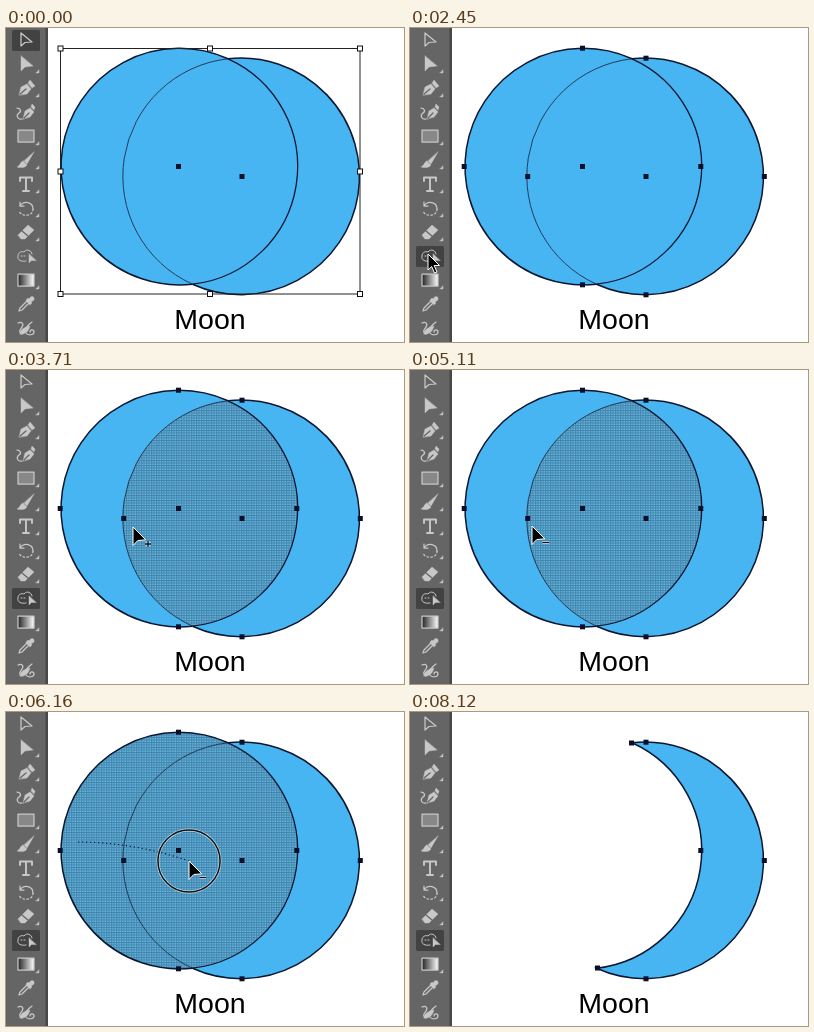
These frames come from a looping animation (398 px wide and 314 px high, 8.26 s). An HTML page:

```html
<!DOCTYPE html>
<html lang="en">
<head>
<meta charset="utf-8">
<title>Moon from two circles</title>
<style>
  html, body { margin: 0; width: 100%; height: 100%; overflow: hidden; background: #fff; }
  svg { display: block; width: 398px; height: 314px; }
  .line { fill: none; stroke: #0b1730; }
  .icon { fill: none; stroke: #c8c8c8; stroke-width: 1.25; stroke-linejoin: round; stroke-linecap: round; }
  .icon .solid { fill: #c8c8c8; stroke-width: .4; }
</style>
</head>
<body>
<svg viewBox="0 0 398 314">
  <defs>
    <pattern id="mesh" width="2.5" height="2.5" patternUnits="userSpaceOnUse">
      <rect width="2.5" height="2.5" fill="#66bbe8"/>
      <path d="M0 .6H2.5M.6 0V2.5" stroke="#0c2f4a" stroke-opacity=".4" stroke-width="1"/>
    </pattern>
    <linearGradient id="ramp"><stop stop-color="#222"/><stop offset="1" stop-color="#fff"/></linearGradient>
  </defs>
  <rect width="398" height="314" fill="#fff"/>
  <g id="toolbar">
    <rect width="41" height="314" fill="#656565"/>
    <rect x="39.5" width="2.5" height="314" fill="#484848"/>
    <rect id="button" x="6" width="28" height="21" rx="1.5" fill="#424242"/>
    <g id="icons"></g>
  </g>
  <g id="art"></g>
  <text x="204" y="301.4" text-anchor="middle" font-size="28.5" font-family="'Liberation Sans', Arial, sans-serif">Moon</text>
  <path id="trail" fill="none" stroke="#0b1730" stroke-width="1.1" stroke-dasharray="1.3 2.7"/>
  <g id="ring" fill="none">
    <circle stroke="#fff" stroke-opacity=".6" stroke-width="3"/>
    <circle stroke="#111" stroke-width="1.5"/>
  </g>
  <g id="cursor">
    <path id="arrow" fill="#000" stroke="#fff" stroke-width="1"/>
    <path class="sign" fill="none" stroke="#fff" stroke-opacity=".7" stroke-width="3"/>
    <path class="sign" fill="none" stroke="#0b1020" stroke-width="1.3"/>
  </g>
</svg>
<script>
const LOOP = 8260, STEP = 70;
const PICK = 2240, ALT = 4480, DRAG = 5700, CUT = 6300, ALT_UP = 7350;
const RING_TIME = 280, RING_SIZE = 50, ringStarts = [2100, 5986];
const $ = id => document.getElementById(id);

// Geometry of the two circles and the regions between them
const R = 118.3, A = [172.5, 138.5], B = [236, 148.5];
const peak = '222 30.8', foot = '186.5 256.2';
const arc = (large, sweep, to) => `A${R} ${R} 0 ${large} ${sweep} ${to}`;
const outerA = `M${peak}${arc(1, 0, foot)}`;
const innerA = `M${peak}${arc(0, 1, foot)}`;
const outerB = `M${peak}${arc(1, 1, foot)}`;
const innerB = `M${peak}${arc(0, 0, foot)}`;
const regions = {
  left: outerA + arc(0, 1, peak) + 'Z',
  lens: innerA + arc(0, 1, peak) + 'Z',
  right: outerB + arc(0, 0, peak) + 'Z'
};

const line = (d, width = 1.5) => `<path class="line" d="${d}" stroke-width="${width}"/>`;
const fill = (name, paint) => `<path d="${regions[name]}" fill="${paint}"/>`;
const square = ([x, y]) => `<rect x="${x - 2.5}" y="${y - 2.5}" width="5" height="5" fill="#0b1028"/>`;
const handle = ([x, y]) =>
  `<rect x="${x - 2.5}" y="${y - 2.5}" width="5" height="5" fill="#fff" stroke="#111"/>`;
const quadrants = ([x, y]) => [[x, y - R], [x + R, y], [x, y + R], [x - R, y]];
const centres = [A, B].map(square).join('');
const anchors = [...quadrants(A), ...quadrants(B)].map(square).join('');
const moonAnchors = [[221.5, 31], [187.5, 256], [A[0] + R, A[1]], ...quadrants(B).slice(0, 3)].map(square).join('');

const xs = [54.5, 204, 354], ys = [20.5, 143.5, 266];
const frameBox = '<path d="M54.5 20.5H354V266H54.5Z" fill="none" stroke="#222"/>' +
  xs.flatMap((x, i) => ys.filter((y, j) => i !== 1 || j !== 1).map(y => handle([x, y]))).join('');

// Toolbar icons, each drawn around its own centre
const icons = [
  '<path d="M-5-7V6L-1 2.5 6 2Z"/>',
  '<path class="solid" d="M-5-8V7L-1 3 7 2Z"/>',
  '<path class="solid" d="M-7 7L-5-1 1-4 5 1 1 6Z M2-5L4-8 9-2 6 0Z"/><path stroke="#656565" d="M-6 6L0 1"/>',
  '<path class="solid" d="M-3 7L-1-1 4-4 8 0 4 5Z M5-5L6-8 9-5 8-2Z"/><path stroke="#656565" d="M-2 6L3 1"/><path d="M-4 7C-9 8-10 3-7 1S-6-4-9-4"/>',
  '<rect x="-8" y="-6" width="16" height="12" fill="#888"/>',
  '<path class="solid" d="M8-8L1 4-2 1Z M-3 1L1 5C-1 8-5 8-9 7-6 6-6 2-3 1Z"/>',
  '<path d="M-6-3V-6.5H6V-3M0-6.500V7M-3 7H3" stroke-width="1.9"/>',
  '<path d="M-6-6V-2H-2M-6-2C-2-8 7-6 7 1"/><path d="M7 1C7 9-5 9-7 3" stroke-dasharray="1.5 2.5"/>',
  '<path class="solid" d="M-8 3L2-7 8-2-1 7H-5Z"/><path d="M-4-1L2 4" stroke="#656565"/>',
  '<g stroke-width="1"><path d="M0 5C-5 6-9 4-8 0-8-4-4-5-2-4 1-8 6-5 6-2"/><path d="M-5 0H1" stroke-dasharray="1 2"/></g><path class="solid" d="M3-2V7L5.500 4.500 10 4.500Z"/>',
  '<rect x="-8" y="-6" width="16" height="12" fill="url(#ramp)"/>',
  '<path d="M-7 7L-6 4 1-3 3-1-4 6Z"/><path class="solid" d="M0-4L2-6 3-5C5-9 9-8 8-4L5-2 6-1 4 1Z"/>',
  '<path d="M-8-5C-4-7-2-4-4-1S-8 4-4 6M-4 3C0 2 1-3 6-6M0 5C2 8 8 7 8 4S4 1 4 4"/><path class="solid" d="M-6 6C-6 1-1-1 4-2 3 2 0 7-6 6Z"/>'
];
const noFlyout = [0, 3, 9, 11, 12];
$('icons').innerHTML = icons.map((shape, i) => {
  const flyout = noFlyout.includes(i) ? '' : '<path class="solid" d="M13 6V9H10Z"/>';
  return `<g class="icon" transform="translate(20 ${12 + i * 24})">${shape}${flyout}</g>`;
}).join('');

// Cursor stops: time, x, y and the power that bends the way there
const stops = [
  [1260, 265, 200], [2100, 18, 226], [2800, 18, 226], [3220, 123, 165], [3500, 127, 157],
  [5040, 127, 157], [5110, 122, 156], [5500, 73, 130], [DRAG, 72, 130], [6160, 183, 149, 2],
  [6440, 208, 163], [7700, 208, 163], [8120, 214, 322]
];
const ease = u => u * u * (3 - 2 * u);

function cursorAt(t) {
  const i = stops.findIndex(s => s[0] >= t);
  if (i < 1) return stops[0].slice(1, 3);
  const [t0, x0, y0] = stops[i - 1], [t1, x1, y1, bend = 1] = stops[i];
  const k = ease((t - t0) / (t1 - t0));
  return [x0 + (x1 - x0) * k, y0 + (y1 - y0) * k ** bend];
}

function regionAt([x, y]) {
  const inA = Math.hypot(x - A[0], y - A[1]) < R;
  const inB = Math.hypot(x - B[0], y - B[1]) < R;
  return inA ? (inB ? 'lens' : 'left') : inB ? 'right' : '';
}

function drawArt(t) {
  const blue = '#48b5f3';
  if (t >= CUT) return fill('right', blue) + line(regions.right) + moonAnchors;
  const lit = [];
  if (t > 2800) lit.push(regionAt(cursorAt(t - STEP)));
  if (t >= DRAG) lit.push('left');
  const paint = name => fill(name, lit.includes(name) ? 'url(#mesh)' : blue);
  return Object.keys(regions).map(paint).join('') +
    line(outerA) + line(outerB) + line(innerA, 1.3) + line(innerB, .8) +
    centres + (t < PICK ? frameBox : anchors);
}

function drawTrail(t) {
  if (t < DRAG || t >= CUT) return '';
  let d = 'M72 130';
  for (let s = DRAG; s <= t; s += 10) d += 'L' + cursorAt(s).map(v => v.toFixed(1)).join(' ');
  return d;
}

function drawRing(t, [x, y]) {
  const start = ringStarts.find(s => t > s && t < s + RING_TIME);
  $('ring').style.display = start ? '' : 'none';
  if (!start) return;
  for (const c of $('ring').children) {
    c.setAttribute('cx', x);
    c.setAttribute('cy', y);
    c.setAttribute('r', RING_SIZE * (t - start) / RING_TIME);
  }
}

function drawCursor(t, [x, y]) {
  const visible = t >= 1260 && t < 8120;
  $('cursor').style.display = visible ? '' : 'none';
  $('cursor').setAttribute('transform', `translate(${x} ${y})`);
  const pointer = t < PICK || x < 42;
  $('arrow').setAttribute('d', pointer
    ? 'M0 0V16L3.7 12.5 6.5 19 9 18 6.2 11.5H11.5Z'
    : 'M0 0V18.5L4.8 13.5 12.8 12.8Z');
  const plus = 'M12 17H18M15 14V20', minus = 'M10.5 16.5H17';
  const sign = pointer || t >= ALT_UP ? '' : t < ALT ? plus : minus;
  document.querySelectorAll('.sign').forEach(p => p.setAttribute('d', sign));
}

function render(now) {
  const t = Math.floor(now % LOOP / STEP) * STEP;
  const at = cursorAt(t);
  $('button').setAttribute('y', t < PICK ? 2 : 218);
  $('art').innerHTML = drawArt(t);
  $('trail').setAttribute('d', drawTrail(t));
  drawRing(t, at);
  drawCursor(t, at);
}

const begin = performance.now();
function tick() {
  render(performance.now() - begin);
  requestAnimationFrame(tick);
}
tick();
</script>
</body>
</html>
```
